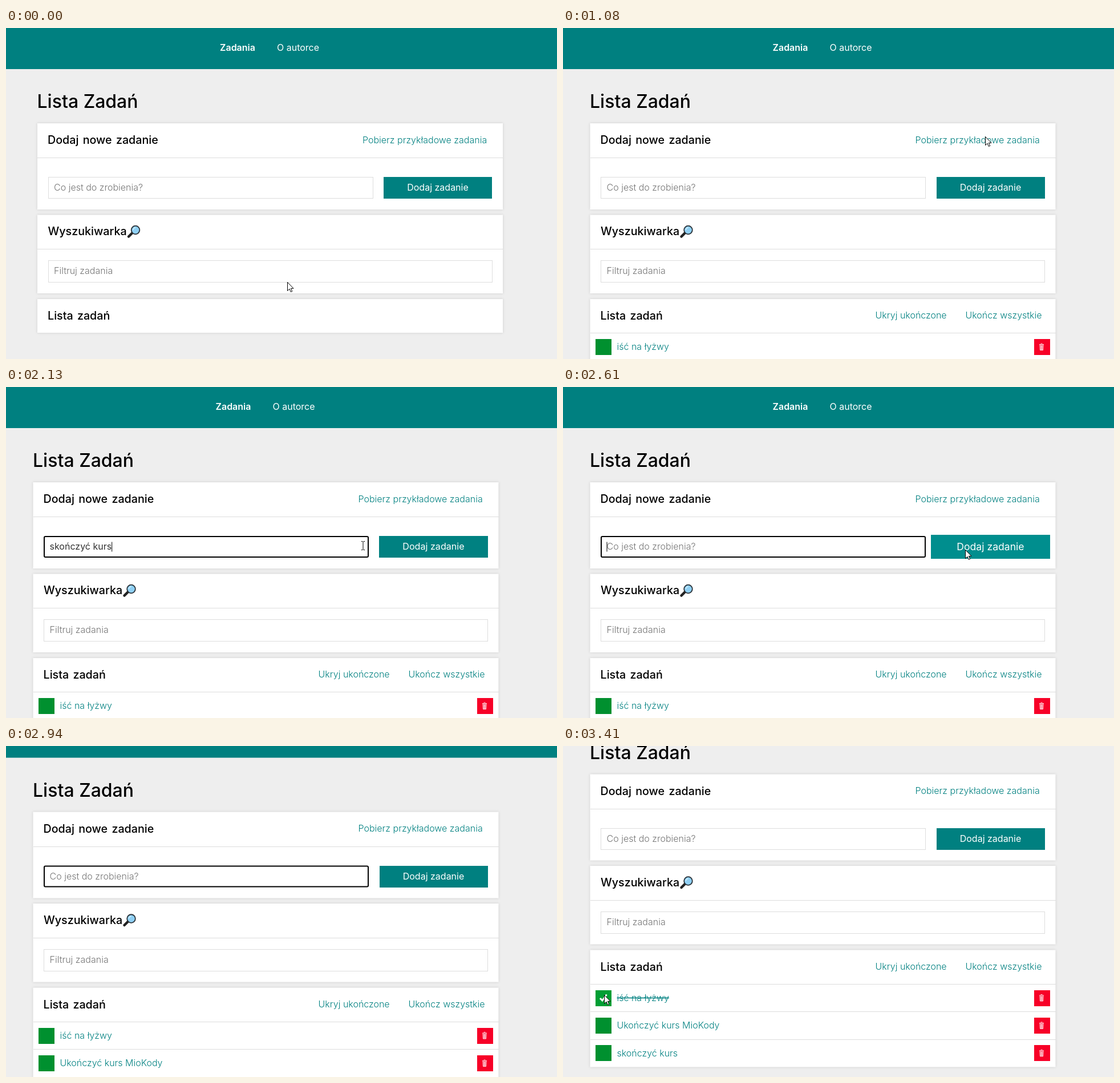
Recreate the animation shown at these times as an HTML page. Size 966 by 580 pixels, loop 3.47 s.

```html
<!DOCTYPE html>
<html lang="pl">
<head>
<meta charset="utf-8">
<title>Lista Zadań</title>
<style>
html, body { margin: 0; width: 100%; height: 100%; overflow: hidden; background: #eee; }
svg { display: block; width: 966px; height: 580px; }
text { font: 400 16px Inter, Roboto, sans-serif; white-space: pre; }
.h1 { font-size: 32px; font-weight: 450; }
.h2 { font-size: 19.7px; font-weight: 500; word-spacing: 2px; }
.nav, .btn text { fill: #fff; }
.link { fill: teal; font-weight: 300; }
.hint { fill: #757575; font-weight: 300; }
.card { fill: #fff; filter: drop-shadow(0 0 2px #ccc); }
.line { stroke: #ddd; }
.field { fill: #fff; stroke: #ddd; }
.line, .field, .tile { shape-rendering: crispEdges; }
.field.focus { stroke: #000; stroke-width: 2; shape-rendering: auto; }
</style>
</head>
<body>
<svg id="stage" viewBox="0 0 966 580"></svg>
<script>
const LOOP = 3470, TASK = "skończyć kurs";
const stage = document.getElementById("stage");

const text = (x, y, s, cls = "", extra = "") => `<text x="${x}" y="${y}" class="${cls}" ${extra}>${s}</text>`;
const rect = (x, y, w, h, attr) => `<rect x="${x}" y="${y}" width="${w}" height="${h}" ${attr}/>`;
const line = y => `<path d="M55 ${y}H871" class="line"/>`;
const card = (y, h, id = "") => rect(55, y, 816, h, `class="card" id="${id}"`);

const row = (label, i) => {
  const y = 545 + i * 48.4;
  return (i ? line(Math.round(y - 10) - .5) : "") +
    rect(64.5, y, 28, 28, `class="tile" fill="#00902f" id="box${i}"`) +
    text(102, y + 19.3, label, "link", `id="task${i}"`) +
    rect(833.5, y, 28, 28, `class="tile" fill="#f70027"`) +
    `<path transform="translate(846.5 ${y + 14})" d="M-4 -4.5H4M-1.5 -6H1.5M-3 -4L-2.5 5.5H2.5L3 -4M-.8 -3V5M.8 -3V5"
      fill="#fff" fill-opacity=".3" stroke="#fff" stroke-opacity=".85"/>`;
};

stage.innerHTML = `
<g id="page">
  ${rect(-10, 0, 1000, 72, 'fill="teal"')}
  ${text(375, 40, "Zadania", "nav", 'style="font-weight:600"')}
  ${text(475, 40, "O autorce", "nav")}
  ${text(54.5, 140, "Lista Zadań", "h1")}
  ${card(167, 151)}${line(227.5)}
  ${text(73, 203, "Dodaj nowe zadanie", "h2")}
  ${text(625, 201.5, "Pobierz przykładowe zadania", "link")}
  ${rect(74, 261.5, 569, 37, 'class="field" id="field"')}
  ${text(84, 285, "Co jest do zrobienia?", "hint", 'id="hint"')}
  ${text(84, 285, "", "", 'id="typed" fill="#333"')}
  <path id="caret" stroke="#000"/>
  <g class="btn" id="button">
    ${rect(662, 261, 190, 38, 'class="tile" fill="teal" id="face"')}
    ${text(757, 285, "Dodaj zadanie", "", 'text-anchor="middle"')}
  </g>
  ${card(327.5, 137.5)}${line(387.5)}
  ${text(73.5, 363, "Wyszukiwarka", "h2")}
  <path d="M215 365.5L221.5 359" stroke="#222" stroke-width="4.5" stroke-linecap="round"/>
  <circle cx="227" cy="354" r="7.3" fill="#8fd0f5" stroke="#2b3238" stroke-width="1.8"/>
  <path d="M223 354A4 4 0 0 1 227 350" fill="none" stroke="#d8f1ff" stroke-width="1.5"/>
  ${rect(74, 407.5, 778, 38, 'class="field"')}
  ${text(84, 431, "Filtruj zadania", "hint")}
  ${card(475, 59, "list")}
  ${text(73, 511, "Lista zadań", "h2")}
  <g id="tasks">
    ${text(555, 509, "Ukryj ukończone", "link")}
    ${text(713, 509, "Ukończ wszystkie", "link")}
    ${line(534.5)}
    ${["iść na łyżwy", "Ukończyć kurs MioKody", TASK].map(row).join("")}
    <path id="check" d="M72.5 559.5L76.5 563.5L84 553" fill="none" stroke="#fff" stroke-width="3"/>
  </g>
</g>
<path id="arrow" d="M.5 .5V15.5L4 12.2L6.3 17.5L8.7 16.4L6.4 11.3H11Z" fill="#fff" stroke="#000"/>
<path id="beam" d="M-3 -7.5H-1L0 -6.5L1 -7.5H3M0 -6.5V6.5M-3 7.5H-1L0 6.5L1 7.5H3" fill="none" stroke="#000"/>`;

const $ = id => document.getElementById(id);
const set = (id, attrs) => { for (const k in attrs) $(id).setAttribute(k, attrs[k]); };
const show = (id, on) => set(id, { visibility: on ? "visible" : "hidden" });
const ramp = (t, a, b) => Math.min(1, Math.max(0, (t - a) / (b - a)));
const ease = p => p * p * (3 - 2 * p);
const linear = p => p;

// time, x, y
const mouse = [
  [40, 493, 445], [530, 490, 89], [620, 490, 89], [860, 740, 190], [1120, 740, 190],
  [1300, 558, 272], [2050, 558, 272], [2220, 705, 285], [3110, 705, 285], [3320, 72, 436]
];
// time, offset
const scrolls = [[2800, 0], [2940, 51], [3070, 112], [3130, 117.5]];

function at(keys, t, curve) {
  const i = keys.findIndex(k => k[0] > t);
  if (i < 0) return keys[keys.length - 1].slice(1);
  if (!i) return keys[0].slice(1);
  const a = keys[i - 1], b = keys[i];
  const p = curve(ramp(t, a[0], b[0]));
  return a.slice(1).map((v, j) => v + (b[j + 1] - v) * p);
}

function draw(t) {
  const loaded = t >= 960, focus = t >= 1310 && t < 3320, sent = t >= 2350, done = t >= 3400;
  const [scroll] = at(scrolls, t, linear);
  set("page", { transform: `translate(${loaded ? -7.5 : 0} ${-scroll})` });
  show("tasks", loaded);
  set("list", { height: loaded ? 205 : 59 });

  const typed = t >= 1400 && !sent ? TASK.slice(0, 1 + Math.floor((t - 1400) / 50)) : "";
  $("typed").textContent = typed;
  show("hint", !typed);
  const x = 84.5 + (typed ? $("typed").getComputedTextLength() : 0);
  set("caret", { d: `M${x} 271.5V288.5` });
  show("caret", focus && (!sent || Math.floor(t / 125) % 2 === 0));
  set("field", focus
    ? { x: 74.5, y: 262, width: 568, height: 36, rx: 2, class: "field focus" }
    : { x: 74, y: 261.5, width: 569, height: 37, rx: 0, class: "field" });

  const hover = ramp(t, 2120, 2270) * (1 - ramp(t, 2760, 2880));
  const s = 1 + .1 * hover;
  set("button", { transform: `translate(757 280) scale(${s}) translate(-757 -280)` });
  const c = 128 + 14 * hover;
  set("face", { fill: `rgb(0,${c},${c})` });

  set("box0", { fill: t >= 3310 ? "#009e34" : "#00902f" });
  set("task0", { "text-decoration": done ? "line-through" : "none" });
  show("check", done);

  const [mx, my] = at(mouse, t, ease);
  const inField = t > 1120 && t < 2200 && my > 261 && my < 299 && mx < 635;
  const place = { transform: `translate(${Math.round(mx)} ${Math.round(my)})` };
  set("arrow", place);
  set("beam", place);
  show("beam", inField);
  show("arrow", !inField && (t < 2820 || t >= 3130));
}

const start = performance.now();
function tick() {
  draw((performance.now() - start) % LOOP);
  requestAnimationFrame(tick);
}
tick();
</script>
</body>
</html>
```
